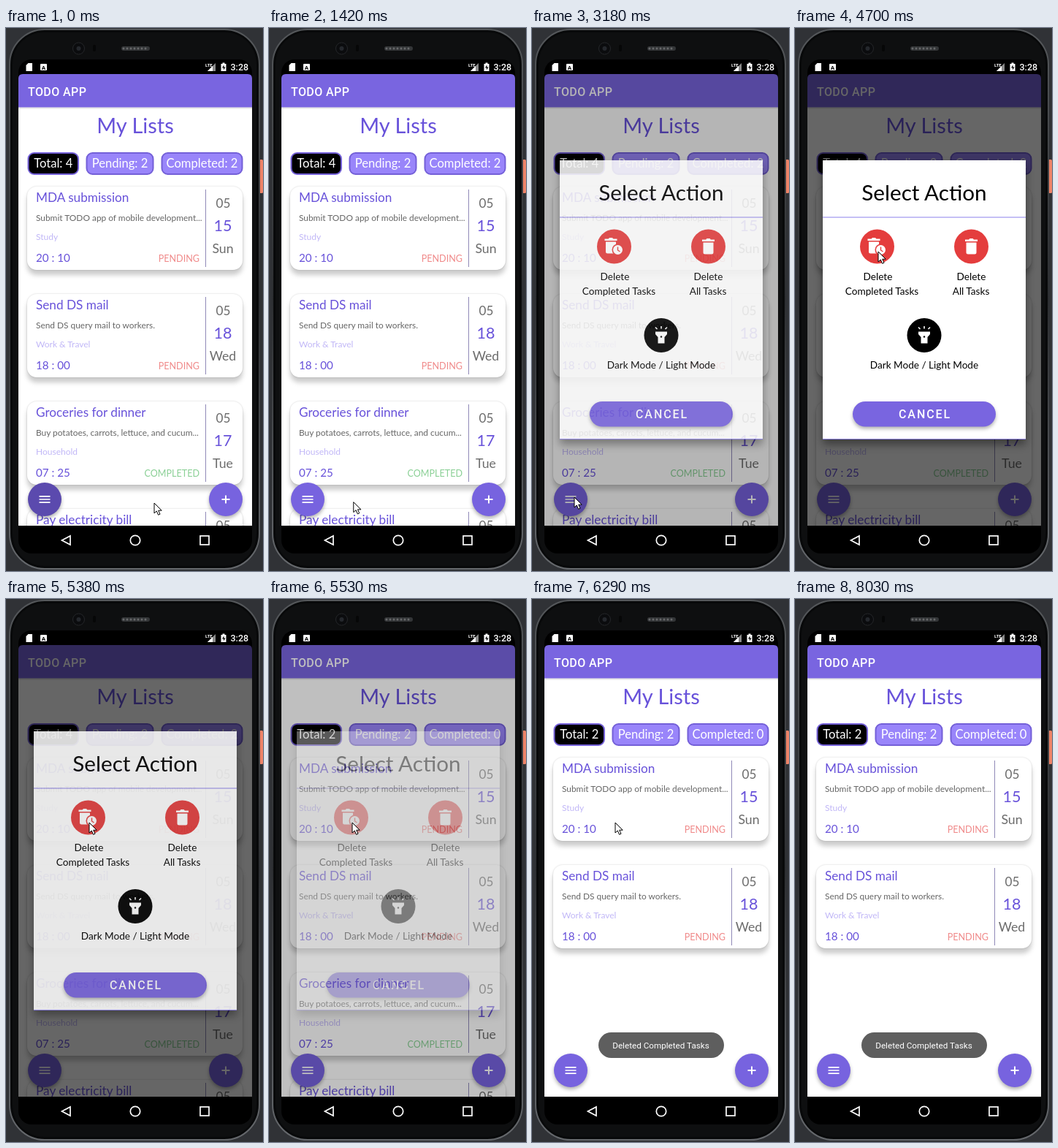
An HTML page for the animation above (8800 ms loop, 352x743 px).

```html
<!DOCTYPE html>
<html lang="en">
<head>
<meta charset="utf-8">
<title>Todo app</title>
<style>
  html, body { margin: 0; width: 100%; height: 100%; overflow: hidden; background: #303236; }
  svg { display: block; width: 352px; height: 743px; }
  text { font-family: Lato, "Open Sans", sans-serif; }
  .ui { font-family: Roboto, sans-serif; }
  .mid { text-anchor: middle; }
  .end { text-anchor: end; }
  .card { filter: drop-shadow(0 0 1px rgba(0, 0, 0, .18)) drop-shadow(0 7px 3px rgba(0, 0, 0, .2)); }
  .lift { filter: drop-shadow(0 3px 2.5px rgba(0, 0, 0, .3)); }
  .sheet { filter: drop-shadow(0 7px 6px rgba(0, 0, 0, .4)); }
</style>
</head>
<body>
<svg viewBox="0 0 352 743" xmlns="http://www.w3.org/2000/svg">
  <defs>
    <clipPath id="page"><rect x="17" y="108" width="320" height="573"/></clipPath>
    <linearGradient id="rim" x2="0" y2="1">
      <stop offset="0" stop-color="#55585b"/>
      <stop offset=".5" stop-color="#2b2d30"/>
      <stop offset="1" stop-color="#66696d"/>
    </linearGradient>
  </defs>

  <!-- phone -->
  <rect x="347" y="180" width="5" height="46" rx="1.5" fill="#ee8368"/>
  <rect x="5" y="2" width="342" height="738" rx="48" fill="#08090a" stroke="url(#rim)" stroke-width="2"/>
  <rect x="9" y="6" width="334" height="730" rx="43" fill="#0e0f10"/>
  <circle cx="99.500" cy="28" r="8" fill="#0b0c0e" stroke="#25272a"/>
  <circle cx="99.500" cy="28" r="3" fill="#25282d"/>
  <rect x="119" y="23" width="4" height="9" rx="2" fill="#060707"/>
  <path d="M161 28H194" stroke="#343638" stroke-width="6" stroke-linecap="round"/>
  <path d="M161 28H195" stroke="#68696b" stroke-width="3" stroke-linecap="round" stroke-dasharray="0 5"/>
  <rect x="17" y="43" width="320" height="676" rx="18"/>

  <!-- status bar -->
  <g fill="#fff">
    <path d="M30.500 48H36V59H27.500V51Z"/>
    <rect x="47" y="49" width="9" height="9" rx="1"/>
    <text class="ui mid" x="51.500" y="56.500" font-size="8" font-weight="700" fill="#000">A</text>
    <text class="ui" x="273" y="52.500" font-size="6" font-weight="700">LTE</text>
    <path d="M287 48V59H276Z" opacity=".55"/><path d="M283 52V59H276Z"/>
    <path d="M296.500 47.500H299.500V49H301.500V59H294.500V49H296.500Z"/>
    <path d="M298.500 50.500L296 54.500H298V57.500L300.500 53.500H298.500Z" fill="#000"/>
    <text class="ui" x="307.500" y="57.500" font-size="12.500" font-weight="500">3:28</text>
  </g>

  <!-- page -->
  <rect x="17" y="108" width="320" height="573" fill="#fff"/>
  <path d="M17 108.500V69Q17 63 23 63H331Q337 63 337 69V108.500Z" fill="#7965e0"/>
  <rect x="17" y="108.500" width="320" height="2" fill="#000" opacity=".1"/>
  <text class="ui" x="30" y="92.500" font-size="16" font-weight="500" letter-spacing=".4" fill="#fff">TODO APP</text>
  <text class="mid" x="177" y="143.500" font-size="29" fill="#6852da">My Lists</text>
  <g id="chips"></g>
  <g id="cards" clip-path="url(#page)"></g>
  <g id="toast">
    <rect x="91" y="593" width="172" height="35" rx="17.500" fill="#5e5e5e"/>
    <text class="ui mid" x="176.500" y="615" font-size="11.700" fill="#fff">Deleted Completed Tasks</text>
  </g>
  <g class="lift">
    <circle id="menu" cx="53" cy="645" r="23"/>
    <circle cx="301" cy="645" r="23" fill="#7763df"/>
  </g>
  <path d="M45.500 640.800H60.500M45.500 645H60.500M45.500 649.200H60.500" stroke="#fff" stroke-width="1.700"/>
  <path d="M295.500 645H306.500M301 639.500V650.500" stroke="#fff" stroke-width="2"/>
  <rect id="dim" x="17" y="63" width="320" height="618"/>

  <!-- dialog -->
  <g id="dialog">
    <rect class="sheet" x="38" y="181" width="278" height="382" fill="#fff"/>
    <path d="M38 259H316M38 562.500H316" stroke="#8c80ea" stroke-width="1"/>
    <text class="mid" x="177" y="235.500" font-size="29.700">Select Action</text>
    <circle cx="112.500" cy="299" r="23.500" fill="#e43d3d"/>
    <circle cx="241.500" cy="299" r="23.500" fill="#e43d3d"/>
    <circle cx="177" cy="420.500" r="23.500"/>
    <g fill="#fff">
      <path id="bin" d="M233 289.500H238L239.500 288H243.500L245 289.500H250V292H233ZM234.500 293.500H248.500V307Q248.500 309.500 246 309.500H237Q234.500 309.500 234.500 307Z"/>
      <use href="#bin" x="-133.500" y="-1"/>
      <circle cx="117.500" cy="303.500" r="8" fill="#e43d3d"/>
      <circle cx="117.500" cy="303.500" r="6.500"/>
      <path d="M117.500 299.500V304L120.500 306" fill="none" stroke="#e43d3d" stroke-width="1.400"/>
      <path d="M169 415.500H185V419L181.500 423V431.500H172.500V423L169 419Z"/>
      <path d="M177 408V411.500M169 409.500L171.500 412M185 409.500L182.500 412" stroke="#fff" stroke-width="1.600"/>
      <circle cx="177" cy="422.500" r="1.200" fill="#000"/>
    </g>
    <g class="mid" font-size="13.600">
      <text x="113.500" y="345">Delete</text>
      <text x="119" y="365">Completed Tasks</text>
      <text x="241.500" y="345">Delete</text>
      <text x="241" y="365">All Tasks</text>
      <text x="177" y="466">Dark Mode / Light Mode</text>
    </g>
    <rect class="lift" x="79" y="511" width="196" height="34.500" rx="17.250" fill="#7965e0"/>
    <text class="ui mid" x="178" y="534" font-size="16" font-weight="500" letter-spacing="1.900" fill="#fff">CANCEL</text>
  </g>

  <!-- navigation bar -->
  <g fill="none" stroke="#fff" stroke-width="1.700">
    <path d="M88 695V707L76.500 701Z"/>
    <circle cx="177" cy="701" r="6.700"/>
    <rect x="266" y="695" width="12" height="12"/>
  </g>
  <path id="cursor" d="M0 0V14L3.300 11L5.600 16.300L8 15.200L5.700 10.200H10.200Z" fill="#fff" stroke="#000" stroke-width="1"/>
</svg>
<script>
const LOOP = 8800;
const $ = id => document.getElementById(id);

const label = (x, y, size, fill, str, cls = '') =>
  `<text class="${cls}" x="${x}" y="${y}" font-size="${size}" fill="${fill}">${str}</text>`;

const chip = (x, w, fill, id) =>
  `<rect x="${x}" y="171" width="${w}" height="29" rx="8" fill="${fill}" stroke="#7460d8" stroke-width="2"/>
   <text id="${id}" class="mid" x="${x + w / 2}" y="190.500" font-size="16.600" fill="#fff"></text>`;

$('chips').innerHTML = chip(30.5, 68.5, '#000', 'total') +
  chip(110.5, 91, '#9985fa', 'pending') + chip(213.5, 110, '#9985fa', 'completed');

const tasks = [
  ['MDA submission', 'Submit TODO app of mobile development...', 'Study', '20 : 10', 'PENDING', '15', 'Sun'],
  ['Send DS mail', 'Send DS query mail to workers.', 'Work &amp; Travel', '18 : 00', 'PENDING', '18', 'Wed'],
  ['Groceries for dinner', 'Buy potatoes, carrots, lettuce, and cucum...', 'Household', '07 : 25', 'COMPLETED', '17', 'Tue'],
  ['Pay electricity bill', '', '', '', 'COMPLETED', '', '']
];

const card = ([title, note, group, time, status, day, week], i) => {
  const done = status === 'COMPLETED';
  return `<g class="task${done ? ' done' : ''}" transform="translate(0 ${217 + 147 * i})">
    <rect class="card" x="29" width="295" height="114" rx="13" fill="#fff"/>
    <path d="M273.500 4V110" stroke="#9089b8"/>` +
    label(41, 21, 17.2, '#6852da', title) +
    label(41, 47, 11.9, '#666', note) +
    label(41, 73, 12, '#c1b7f7', group) +
    label(41, 102.5, 15.2, '#6852da', time) +
    label(265, 102.5, 12.6, done ? '#8bd096' : '#f08a8a', status, 'end') +
    label(297.5, 29, 17.2, '#6c6c6c', '05', 'mid') +
    label(297, 60.5, 21.5, '#6852da', day, 'mid') +
    label(297, 91, 17.7, '#6c6c6c', week, 'mid') + '</g>';
};
$('cards').innerHTML = tasks.map(card).join('');
const doneCards = document.querySelectorAll('.done');

// Stepped pointer move along an eased line, from a to b in n steps.
const move = (start, end, n, a, b) => Array.from({ length: n }, (_, i) => {
  const p = (i + 1) / n, e = p * p * (3 - 2 * p);
  return [start + (end - start) * i / (n - 1), a[0] + (b[0] - a[0]) * e, a[1] + (b[1] - a[1]) * e];
});

const rest = [203, 650], half = [136, 651], onMenu = [58, 642], onDelete = [114, 306], low = [240, 651];
const pointer = [
  [0, ...rest],
  ...move(710, 1010, 3, rest, half),
  ...move(1420, 1720, 3, half, onMenu),
  ...move(3860, 4700, 7, onMenu, onDelete),
  ...move(6720, 7440, 6, onDelete, low),
  [7880, 256, 726],
  [8030, 400, 800]
];

// time, dialog opacity, dim opacity
const modal = [
  [0, 0, 0], [2900, .3, .08], [3040, .6, .18], [3180, .85, .29], [3300, 1, .6],
  [5380, .85, .6], [5530, .35, .25], [5650, 0, 0]
];
const toast = [[0, 0], [5900, .3], [6030, .65], [6160, .9], [6290, 1]];

const at = (table, t) => table.reduce((last, row) => row[0] <= t ? row : last);

function draw() {
  const t = performance.now() % LOOP;
  const [, x, y] = at(pointer, t);
  const [, shown, dim] = at(modal, t);
  const cleared = t >= 5530;
  $('cursor').setAttribute('transform', `translate(${x} ${y})`);
  $('dialog').style.opacity = shown;
  $('dim').style.opacity = dim;
  $('toast').style.opacity = at(toast, t)[1];
  $('menu').style.fill = t < 710 ? '#5b4aae' : '#7763df';
  $('total').textContent = cleared ? 'Total: 2' : 'Total: 4';
  $('pending').textContent = 'Pending: 2';
  $('completed').textContent = cleared ? 'Completed: 0' : 'Completed: 2';
  doneCards.forEach(el => el.style.display = t < 5780 ? '' : 'none');
  requestAnimationFrame(draw);
}
draw();
</script>
</body>
</html>
```
